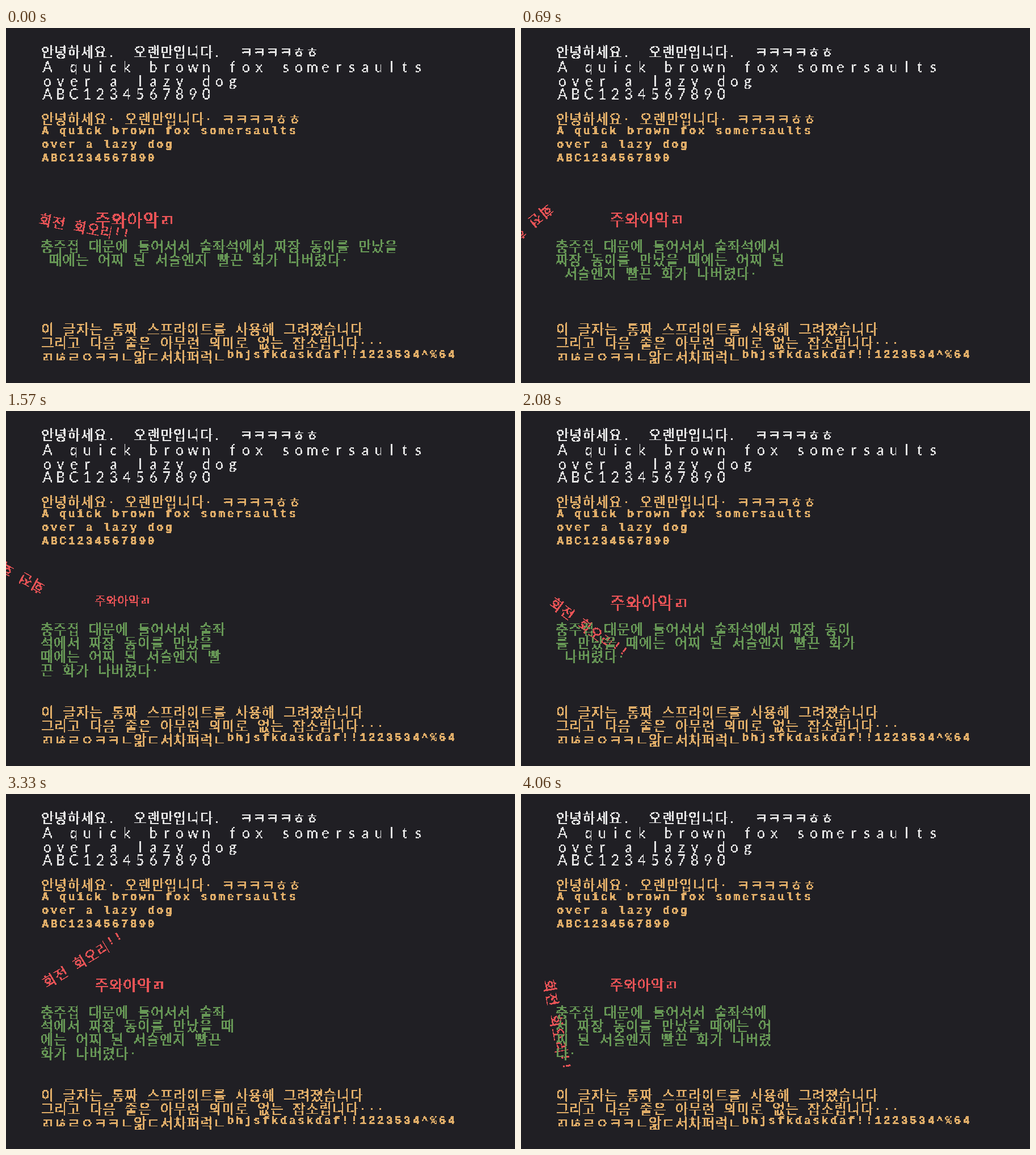
Animation, 897 px wide and 625 px high, one loop 4160 ms. Source, as an HTML page with a canvas:

```html
<!DOCTYPE html>
<html lang="ko">
<head>
<meta charset="utf-8">
<title>Pixel text</title>
<style>
html, body { margin: 0; width: 100%; height: 100%; overflow: hidden; background: #201f24; }
canvas { display: block; }
</style>
</head>
<body>
<canvas id="stage" width="897" height="625"></canvas>
<script>
const ORANGE = '#e0ad68', WHITE = '#e4e4e4', RED = '#e85356', GREEN = '#669655', BACK = '#201f24';
const UNIT = 1.945, WIDE = 12 * UNIT, NARROW = 8 * UNIT;
const DOT = 1.5, BOX = 20, PAD = 3;
const LOOP = 4160;

const STYLES = {
  hangul: { font: '24px "Noto Sans CJK KR", "Noto Sans CJK JP", sans-serif', base: 20.6, bold: 0.65 },
  hand: { font: '25px Lato, sans-serif', base: 20.6, bold: 0.2 },
  mono: { font: '700 20px "Liberation Mono", monospace', base: 13, bold: 0.4 }
};

function makeCanvas(w, h) {
  const c = document.createElement('canvas');
  c.width = w;
  c.height = h;
  return c;
}

function setup(canvas) {
  const ctx = canvas.getContext('2d');
  ctx.imageSmoothingEnabled = false;
  return ctx;
}

const isHangul = ch => ch.charCodeAt(0) >= 0x3130;
const isDot = ch => ch === '.' || ch === '·';
const cellOf = (ch, hand) => hand || isHangul(ch) ? WIDE : NARROW;

// Each character becomes a hard-edged sprite on a coarse grid.
const cache = new Map();
function glyph(ch, color, hand) {
  const name = hand ? 'hand' : isHangul(ch) || isDot(ch) ? 'hangul' : 'mono';
  const key = name + color + ch;
  if (cache.has(key)) return cache.get(key);
  const style = STYLES[name];
  const sprite = makeCanvas(BOX, BOX);
  const c = sprite.getContext('2d', { willReadFrequently: true });
  c.scale(1 / DOT, 1 / DOT);
  c.font = style.font;
  c.textAlign = 'center';
  c.fillStyle = c.strokeStyle = color;
  c.lineWidth = style.bold;
  c.lineJoin = 'round';
  const x = PAD + cellOf(ch, hand) / 2, y = PAD + style.base;
  c.fillText(ch, x, y);
  c.strokeText(ch, x, y);
  const img = c.getImageData(0, 0, BOX, BOX);
  const rgb = [1, 3, 5].map(i => parseInt(color.slice(i, i + 2), 16));
  for (let i = 0; i < img.data.length; i += 4) {
    const on = img.data[i + 3] > 125;
    img.data.set([...rgb, on ? 255 : 0], i);
  }
  c.putImageData(img, 0, 0);
  cache.set(key, sprite);
  return sprite;
}

function write(ctx, text, x, y, color, hand = false) {
  for (const ch of text) {
    if (ch !== ' ') {
      ctx.drawImage(glyph(ch, color, hand), x - PAD, y - PAD, BOX * DOT, BOX * DOT);
    }
    x += cellOf(ch, hand);
  }
}

function wrap(text, limit) {
  const lines = [''];
  let width = 0;
  for (const ch of text) {
    const w = cellOf(ch);
    if (width + w > limit) {
      lines.push('');
      width = 0;
    }
    lines[lines.length - 1] += ch;
    width += w;
  }
  return lines;
}

function drawStill(ctx) {
  ctx.fillStyle = BACK;
  ctx.fillRect(0, 0, 897, 625);
  write(ctx, '안녕하세요.  오랜만입니다.  ㅋㅋㅋㅋㅎㅎ', 61, 30, WHITE);
  write(ctx, 'A quick brown fox somersaults', 61, 56.5, WHITE, true);
  write(ctx, 'over a lazy dog', 61, 81.5, WHITE, true);
  write(ctx, 'ABC1234567890', 61, 104.5, WHITE, true);

  write(ctx, '안녕하세요· 오랜만입니다· ㅋㅋㅋㅋㅎㅎ', 61, 148, ORANGE);
  write(ctx, 'A quick brown fox somersaults', 61, 173, ORANGE);
  write(ctx, 'over a lazy dog', 61, 197, ORANGE);
  write(ctx, 'ABC1234567890', 61, 221, ORANGE);

  write(ctx, '이 글자는 통짜 스프라이트를 사용해 그려졌습니다', 61, 518, ORANGE);
  write(ctx, '그리고 다음 줄은 아무런 의미로 없는 잡소립니다···', 61, 542, ORANGE);
  write(ctx, 'ㄺㄶㄹㅇㅋㅋㄴ앎ㄷ서차퍼럭ㄴbhjsfkdaskdaf!!1223534^%64', 61, 567, ORANGE);
}

// Motion: time marks, ticks between them, then angle in degrees and phases in turns.
const TIMES = [0, 310, 1060, 2080, 2790, 3330, 4060];
const TICKS = [10, 24, 33, 23, 18, 24];
const ANGLE = [11, -90, -349.5, -683.5, -916.5, -1111, -1360];
const SWELL = [0.28, 0.84, 1.96, 3.32, 4.482, 5.45, 6.475];
const FLOW = [0.387, 1.097, 2.81, 5.035, 6.623, 7.898, 9.569];
const STORY = '충주집 대문에 들어서서 술좌석에서 짜장 동이를 만났을 때에는 어찌 된 서슬엔지 빨끈 화가 나버렸다·';

const wave = turns => Math.sin(turns * 2 * Math.PI);

function poseAt(t) {
  let i = 0;
  while (i < TICKS.length - 1 && t >= TIMES[i + 1]) i++;
  const part = Math.min(1, (t - TIMES[i]) / (TIMES[i + 1] - TIMES[i]));
  const u = Math.floor(part * TICKS[i] + 1e-6) / TICKS[i];
  const mix = list => list[i] + (list[i + 1] - list[i]) * u;
  return {
    angle: mix(ANGLE) * Math.PI / 180,
    scale: 1 + 0.22 * wave(mix(SWELL)),
    limit: (250 + 120 * wave(mix(FLOW))) * UNIT
  };
}

const ctx = setup(document.getElementById('stage'));
const still = makeCanvas(897, 625);
drawStill(setup(still));

function draw(t) {
  const pose = poseAt(t);
  ctx.drawImage(still, 0, 0);

  ctx.save();
  ctx.translate(60.5, 324.5);
  ctx.rotate(pose.angle);
  write(ctx, '회전 회오리!!', 0, 0, RED);
  ctx.restore();

  ctx.save();
  ctx.translate(156, 323.5);
  ctx.scale(pose.scale, pose.scale);
  write(ctx, '주와아악ㄺ', 0, 0, RED);
  ctx.restore();

  wrap(STORY, pose.limit).forEach((line, row) => write(ctx, line, 60, 372 + row * 24.2, GREEN));
}

const start = performance.now();
function tick() {
  draw((performance.now() - start) % LOOP);
  requestAnimationFrame(tick);
}
tick();
</script>
</body>
</html>
```
